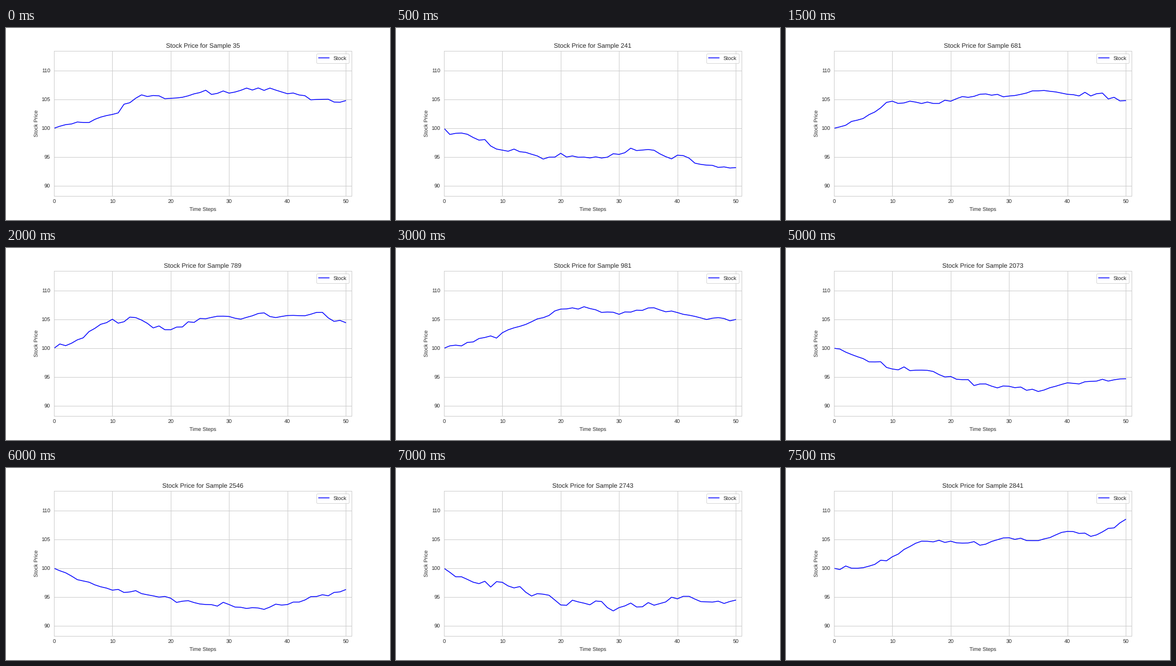
A matplotlib script for the animation above (8000 ms loop, 720 by 360 pixels).

```python
import numpy as np
import matplotlib.pyplot as plt
from matplotlib.animation import FuncAnimation

plt.rcParams.update({
    "font.family": "Liberation Sans", "font.size": 10, "text.hinting": "none",
    "text.color": ".15", "axes.labelcolor": ".15",
    "xtick.color": ".15", "ytick.color": ".15",
    "xtick.bottom": False, "ytick.left": False,
    "axes.edgecolor": ".8", "axes.linewidth": 1, "axes.axisbelow": True,
    "axes.grid": True, "grid.color": ".8", "grid.linewidth": 1,
    "lines.solid_capstyle": "round",
})

START, STEPS, GAP = 100, 50, 5
steps = np.arange(STEPS + 1)


def through(number, *knots):
    """Path through a price every GAP steps, with small jitter in between."""
    rng = np.random.default_rng(number)
    trend = np.interp(steps, steps[::GAP], [START, *knots])
    jitter = rng.normal(0, 0.2, STEPS + 1)
    jitter[::GAP] = 0
    return number, trend + jitter


def walk(number, low):
    """Mean-reverting random path with its lowest price at low."""
    rng = np.random.default_rng(number)
    side = -1 if low < START - 2 else 1
    trend = side * 6 * (1 - np.exp(-steps / 12))
    noise = np.zeros(STEPS + 1)
    for i in steps[1:]:
        noise[i] = 0.9 * noise[i - 1] + rng.normal(0, 0.4)
    move = trend + noise
    if side < 0:
        return number, START + move * (low - START) / move.min()
    return number, low + np.abs(START + move - low)


samples = [
    through(35, 101, 102.4, 105.8, 105.2, 106.2, 106.1, 107, 106, 105, 104.8),
    walk(241, 93.1),
    walk(455, 100),
    through(681, 101.7, 104.7, 104.3, 104.7, 105.9, 105.6, 106.5, 105.9, 106, 104.8),
    walk(789, 99.8),
    walk(884, 99.9),
    through(981, 101.1, 102.7, 104.6, 106.8, 106.9, 105.9, 107, 106.2, 105, 105),
    walk(1187, 93.4),
    through(1392, 103.3, 103.9, 103.8, 104.1, 105.4, 105.6, 105.6, 105.9, 106, 105.4),
    walk(1733, 92.4),
    through(2073, 98.2, 96.4, 96.2, 95.1, 93.8, 93.4, 92.5, 94, 94.3, 94.7),
    walk(2310, 93.6),
    through(2546, 97.8, 96.2, 95.6, 94.8, 93.8, 93.7, 93.1, 93.7, 95.1, 96.3),
    walk(2644, 99.9),
    walk(2743, 92.6),
    through(2841, 100.1, 102, 104.7, 104.7, 104, 105.3, 104.8, 106.4, 105.8, 108.5),
]

fig, ax = plt.subplots(figsize=(10, 5), dpi=72)
fig.subplots_adjust(left=0.125, right=0.9, bottom=0.125, top=0.88)
ax.set(xlim=(0, STEPS + 1), ylim=(88.24, 113.41),
       xticks=range(0, 51, 10), yticks=range(90, 111, 5),
       xlabel="Time Steps", ylabel="Stock Price")
line, = ax.plot([], [], color="blue", lw=1.5, label="Stock")
title = ax.set_title("", fontsize=12)
ax.legend(loc="upper right")


def update(frame):
    number, prices = samples[frame]
    line.set_data(steps, prices)
    title.set_text(f"Stock Price for Sample {number}")
    return line, title


anim = FuncAnimation(fig, update, frames=len(samples), interval=500,
                     repeat=True, repeat_delay=0)
plt.show()
```
